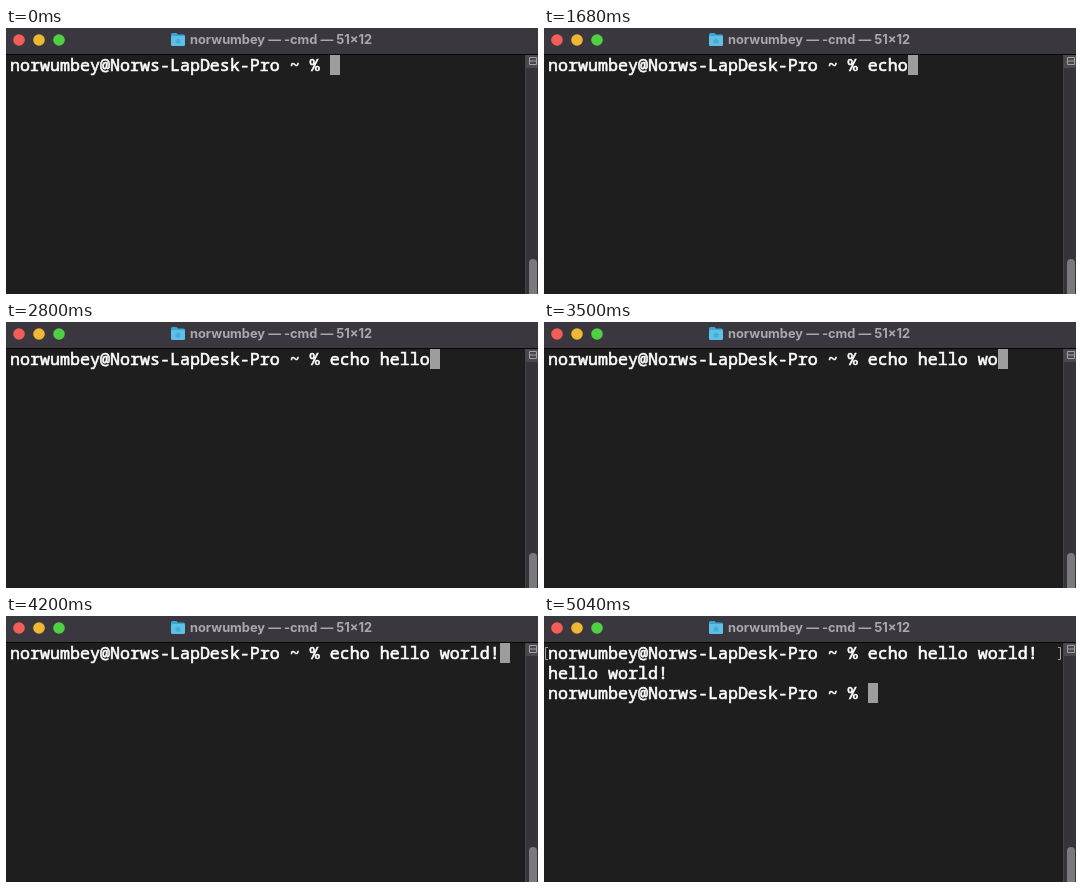
Write an HTML page that moves like this. It is 532 by 266 pixels and loops after 5.95 s.

```html
<!DOCTYPE html>
<html lang="en">
<head>
<meta charset="utf-8">
<title>Terminal</title>
<style>
  html, body { margin: 0; width: 100%; height: 100%; overflow: hidden; background: #1e1e1e; }
  svg { display: block; width: 532px; height: 266px; }
  .row { font: 500 16.667px "Noto Sans Mono", "DejaVu Sans Mono", monospace; fill: #fff;
         stroke: #fff; stroke-width: .6px; white-space: pre; }
  .title { font: 700 12.85px Inter, "Open Sans", sans-serif; fill: #aaa7ad; }
</style>
</head>
<body>
<svg viewBox="0 0 532 266">
  <rect width="532" height="266" fill="#1e1e1e"/>

  <!-- title bar -->
  <rect width="532" height="26" fill="#3b373e"/>
  <rect y="26" width="532" height="1" fill="#070707"/>
  <circle cx="13" cy="12" r="5.8" fill="#f25e57"/>
  <circle cx="33" cy="12" r="5.8" fill="#f0b832"/>
  <circle cx="53" cy="12" r="5.8" fill="#4fd043"/>
  <path d="M165 6.5q0-1.5 1.5-1.5h4l1.5 1.5h5.5q1.5 0 1.5 1.5v3h-14z" fill="#3aa5d2"/>
  <rect x="165" y="8" width="14" height="10" rx="1.2" fill="#5cc0e8"/>
  <path d="M168.8 13l3.2-2.8 3.2 2.8h-.9v2.6h-4.6V13z" fill="#48acd5"/>
  <text class="title" x="184" y="16.4" id="title"></text>

  <!-- scroll bar -->
  <rect x="519" y="27" width="13" height="239" fill="#37333a"/>
  <rect x="519" y="27" width="1" height="239" fill="#454149"/>
  <rect x="520" y="27" width="12" height="13" fill="#4b484e"/>
  <path d="M523.5 29.5h7v7h-7zM523.5 33h7" fill="none" stroke="#a3a1a5"/>
  <path d="M523 266v-31a4 4 0 0 1 8 0v31z" fill="#7b787e"/>

  <!-- screen -->
  <path id="marks" d="M4 31.5H1.5v12H4M514 31.5h2.5v12H514" fill="none" stroke="#a2a2a2"/>
  <rect id="cursor" width="10" height="20" fill="#9d9d9d"/>
  <text class="row" x="4" y="43"></text>
  <text class="row" x="4" y="63"></text>
  <text class="row" x="4" y="83"></text>
</svg>
<script>
  const LOOP = 5950, CELL = 10, LINE = 20, LEFT = 4, TOP = 27;
  const user = "norwumbey";
  const prompt = user + "@Norws-LapDesk-Pro ~ % ";
  const output = "hello world!";
  const command = "echo " + output;
  const keys = [910, 1120, 1260, 1680, 1890, 2240, 2310, 2450, 2660,
                2800, 3290, 3360, 3500, 3640, 3780, 3850, 4200];
  const ENTER = 4970, DONE = 5040;

  const byId = id => document.getElementById(id);
  const rows = [...document.querySelectorAll(".row")];
  const cursor = byId("cursor"), marks = byId("marks");
  byId("title").textContent = user + " — -cmd — 51×12";

  function setText(el, text) {
    if (el.textContent !== text) el.textContent = text;
  }

  function draw(t) {
    const typed = keys.filter(k => k <= t).length;
    const entered = t >= ENTER, done = t >= DONE;
    const lines = [prompt + command.slice(0, typed), done ? output : "", done ? prompt : ""];
    const active = done ? 2 : entered ? 1 : 0;
    rows.forEach((row, i) => setText(row, lines[i]));
    cursor.setAttribute("x", LEFT + lines[active].length * CELL);
    cursor.setAttribute("y", TOP + active * LINE);
    marks.setAttribute("visibility", entered ? "visible" : "hidden");
  }

  const start = performance.now();
  function tick() {
    draw((performance.now() - start) % LOOP);
    requestAnimationFrame(tick);
  }
  tick();
</script>
</body>
</html>
```
